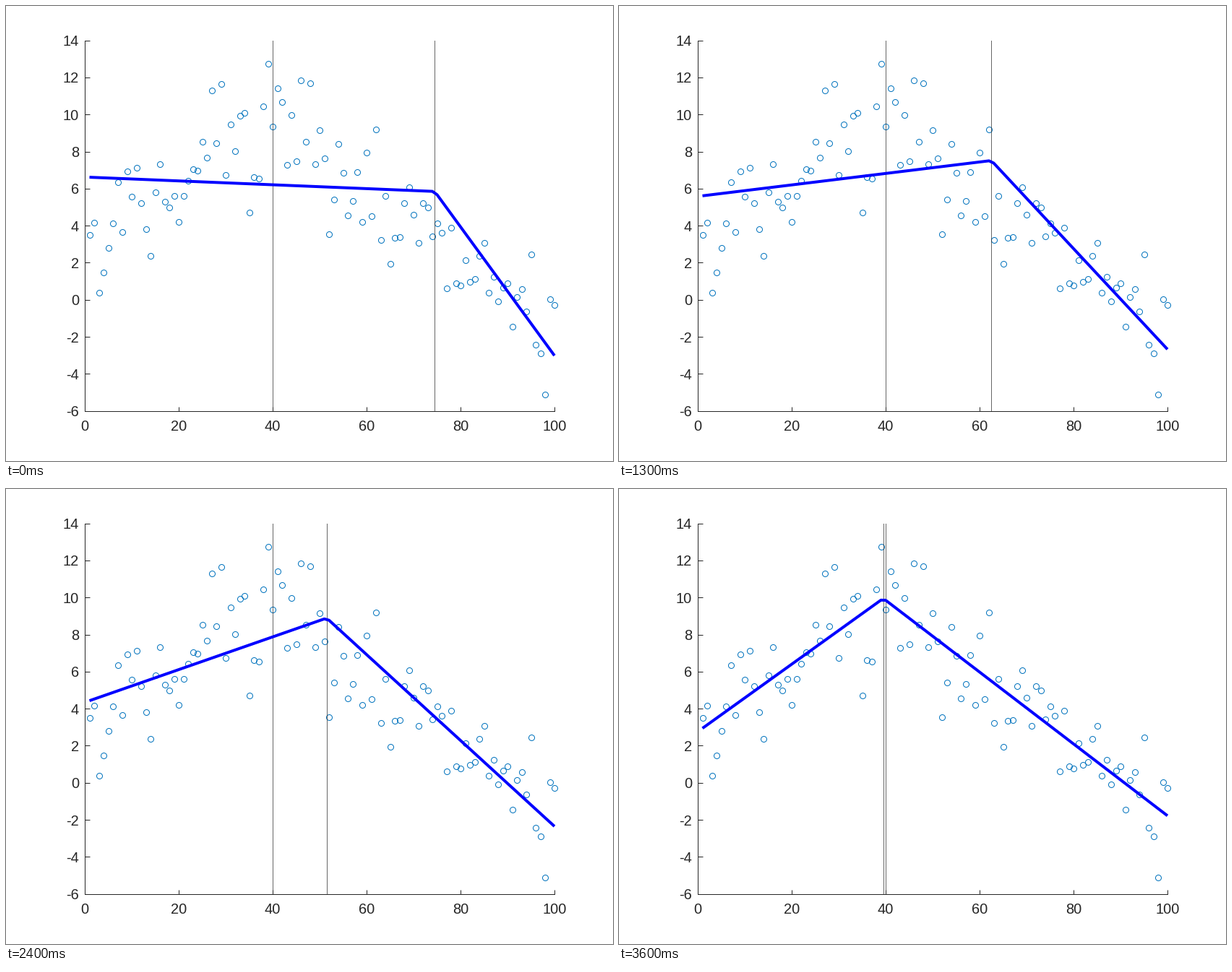
Recreate the animation shown at these times as a matplotlib script. Size 840 px wide and 630 px high, loop 3.8 s.

```python
import matplotlib.pyplot as plt
import numpy as np
from matplotlib.animation import FuncAnimation

W, H, DPI = 840, 630, 100
PX = 72 / DPI                      # points per pixel
FRAMES, INTERVAL = 38, 100
START, STEPS = 74.5, 35            # breakpoint moves left one unit per step
INK = (0.15, 0.15, 0.15)

plt.rcParams.update({
    "font.family": "Liberation Sans",
    "font.size": 20 * PX,
    "axes.unicode_minus": False,
})

x = np.arange(1, 101)
y = np.array([
    3.52, 4.15, 0.37, 1.48, 2.80, 4.11, 6.33, 3.66, 6.95, 5.55,
    7.13, 5.22, 3.82, 2.36, 5.82, 7.32, 5.28, 4.97, 5.61, 4.21,
    5.59, 6.41, 7.03, 6.99, 8.53, 7.69, 11.30, 8.47, 11.63, 6.74,
    9.45, 8.04, 9.93, 10.09, 4.71, 6.62, 6.56, 10.44, 12.76, 9.33,
    11.41, 10.69, 7.28, 9.99, 7.48, 11.84, 8.53, 11.67, 7.34, 9.17,
    7.65, 3.54, 5.41, 8.43, 6.87, 4.54, 5.34, 6.89, 4.21, 7.95,
    4.50, 9.21, 3.23, 5.59, 1.95, 3.33, 3.39, 5.20, 6.08, 4.60,
    3.06, 5.22, 4.99, 3.43, 4.13, 3.60, 0.60, 3.91, 0.88, 0.78,
    2.14, 0.97, 1.11, 2.38, 3.08, 0.39, 1.25, -0.08, 0.64, 0.88,
    -1.44, 0.14, 0.58, -0.62, 2.45, -2.43, -2.90, -5.12, 0.02, -0.27,
])


def hinge_fit(knot):
    """Least-squares broken line with its bend at knot."""
    basis = np.column_stack([np.ones(x.size), x, np.maximum(x - knot, 0)])
    coef = np.linalg.lstsq(basis, y, rcond=None)[0]
    return basis @ coef


fig = plt.figure(figsize=(W / DPI, H / DPI), dpi=DPI, facecolor="white")
ax = fig.add_axes([109 / W, 69.3 / H, 650 / W, 513 / H])
ax.set(xlim=(0, 100), ylim=(-6, 14),
       xticks=range(0, 101, 20), yticks=range(-6, 15, 2))
ax.spines[["top", "right"]].set_visible(False)
for side in ("left", "bottom"):
    ax.spines[side].set(color=INK, linewidth=PX)
ax.tick_params(direction="in", length=6.5 * PX, width=PX,
               color=INK, labelcolor=INK)
ax.tick_params(axis="x", pad=12.7 * PX)
ax.tick_params(axis="y", pad=8 * PX)

ax.plot(x, y, "o", ms=8 * PX, mfc="none", mec=(0, 0.447, 0.741),
        mew=PX, clip_on=False, zorder=2)
rule = dict(color=INK, alpha=0.7, lw=PX, zorder=3)
ax.axvline(40, **rule)
marker = ax.axvline(START, **rule)
curve, = ax.plot(x, hinge_fit(START), color="blue", lw=4 * PX,
                 solid_capstyle="butt", solid_joinstyle="round",
                 clip_on=False, zorder=4)


def update(i):
    knot = START - min(max(i - 1, 0), STEPS)
    marker.set_xdata([knot, knot])
    curve.set_ydata(hinge_fit(knot))
    return marker, curve


anim = FuncAnimation(fig, update, frames=FRAMES, interval=INTERVAL,
                     repeat=True, repeat_delay=0, blit=False)
plt.show()
```
